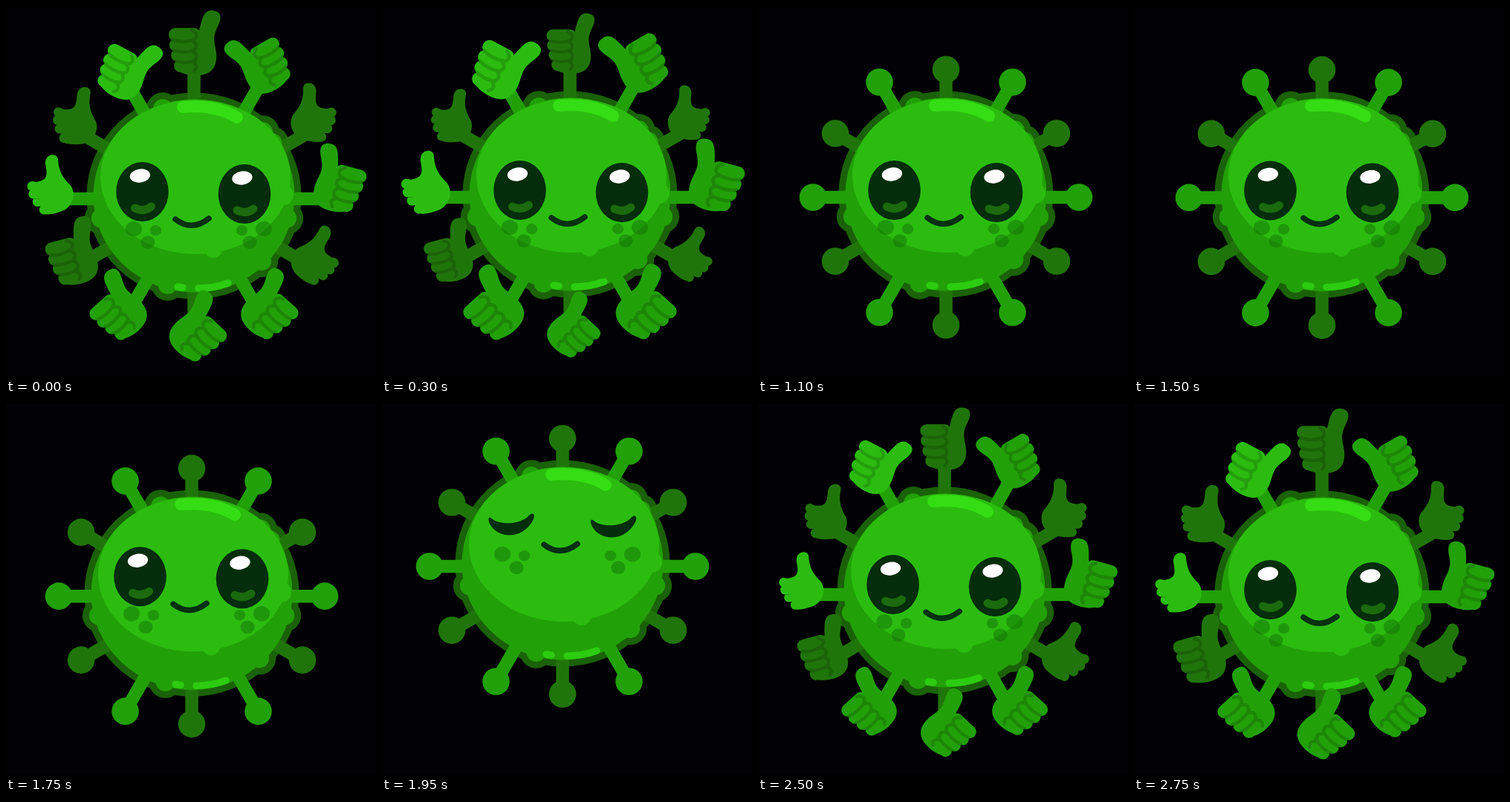
An HTML page for the animation above (2800 ms loop, 498 px wide and 498 px high).

```html
<!DOCTYPE html>
<html lang="en">
<head>
<meta charset="utf-8">
<title>Happy virus</title>
<style>
html, body { margin: 0; width: 100%; height: 100%; overflow: hidden; background: #020103; }
svg { display: block; width: 100vw; height: 100vh; }
</style>
</head>
<body>
<svg id="stage" viewBox="0 0 498 498">
  <g id="rim" fill="#1a6107"></g>
  <g id="stems" stroke-width="17.5"></g>
  <g id="body">
    <g id="mid" fill="#22a008"></g>
    <g fill="#2bbc0f">
      <ellipse cx="255" cy="228" rx="128" ry="104"/>
      <circle cx="373" cy="252" r="14"/>
      <circle cx="279" cy="325" r="12"/>
    </g>
    <g fill="none" stroke="#35de14" stroke-linecap="round">
      <path d="M238 134Q282 130 311 148" stroke-width="16"/>
      <path d="M231 376L238 377M259 378Q280 378 299 371" stroke="#2ccc10" stroke-width="9.5"/>
    </g>
  </g>
  <g id="face">
    <g id="spots" fill="#126a06" fill-opacity=".45"></g>
    <path d="M228 285Q250 302 273 284" fill="none" stroke="#043010" stroke-width="7.5" stroke-linecap="round"/>
    <g id="eyes"></g>
  </g>
  <g id="balls"></g>
  <g id="hands" stroke-linecap="round"></g>
</svg>
<script>
const NS = 'http://www.w3.org/2000/svg';
const LOOP = 2800, CX = 253, CY = 257.5, TAU = Math.PI * 2;
const DARK = '#20750a', MID = '#22a008', LIGHT = '#2bbc0f';
const $ = id => document.getElementById(id);

function add(parent, tag, attrs) {
  const el = document.createElementNS(NS, tag);
  for (const k in attrs) el.setAttribute(k, attrs[k]);
  parent.appendChild(el);
  return el;
}
const set = (el, v) => el.setAttribute('transform', v);
const show = (el, on) => el.setAttribute('visibility', on ? 'visible' : 'hidden');
const clamp = x => Math.max(0, Math.min(1, x));

// eased value at time t through [time, value] keys
function key(t, keys) {
  if (t <= keys[0][0]) return keys[0][1];
  for (let i = 1; i < keys.length; i++) {
    const [a, x] = keys[i - 1], [b, y] = keys[i];
    if (t <= b) {
      const p = (t - a) / (b - a);
      return x + (y - x) * p * p * (3 - 2 * p);
    }
  }
  return keys[keys.length - 1][1];
}

// both hands point their fingers left, thumb up
function fist(g) {
  const art = add(g, 'g', { transform: 'translate(0 36)' });
  let fingers = '', lines = '';
  for (let k = 0; k < 4; k++) {
    const y = -47 + 14 * k;
    fingers += `M${-25 + 0.8 * k * k} ${y}L0 ${y}`;
    lines += `M-3 ${y - 6}q11 6 3 13`;
    if (k < 3) lines += `M${-30 + k} ${y + 7}q15 5 30 0`;
  }
  add(art, 'path', { d: fingers, 'stroke-width': 18 });
  add(art, 'path', {
    d: 'M-4 -50C8 -44 7 -56 10 -64C13 -76 18 -81 27 -79C38 -77 37 -68 32 -58' +
      'C24 -42 28 -38 30 -22C32 0 20 8 2 8C-10 8 -20 4 -22 0Z', stroke: 'none'
  });
  add(art, 'path', { d: lines, fill: 'none', stroke: '#000', 'stroke-opacity': 0.16, 'stroke-width': 4.5 });
}
function open(g) {
  let fingers = '';
  for (let k = 0; k < 4; k++) fingers += `M${-25 + 1.8 * k * k} ${2 + 10.5 * k}L10 ${8 + 5 * k}`;
  add(g, 'path', { d: fingers, 'stroke-width': 13 });
  add(g, 'path', {
    d: 'M-18 -4C-2 -6 -5 -16 -7 -28C-8 -42 9 -44 10 -34C11 -16 18 -8 27 1' +
      'C36 14 28 32 14 36C6 39 0 40 -6 40L-20 8Z', stroke: 'none'
  });
}

// clockwise from the top; end = moment the hand has shrunk away
const HANDS = [
  { draw: fist, turn: 0, lift: 38, end: 960 },
  { draw: fist, turn: -30, lift: 31, end: 850 },
  { draw: open, turn: -5, lift: 30, end: 778 },
  { draw: fist, turn: 15, lift: 26, end: 905 },
  { draw: open, turn: 22, lift: 11, end: 900 },
  { draw: fist, turn: 42, lift: 10, end: 925 },
  { draw: fist, turn: 43, lift: -3, end: 970 },
  { draw: fist, turn: -42, lift: 9, end: 640 },
  { draw: fist, turn: -15, lift: 14, end: 630 },
  { draw: open, turn: 0, lift: 19, end: 850 },
  { draw: open, turn: 15, lift: 26, end: 850 },
  { draw: fist, turn: 28, lift: 23, end: 920 }
];

// body with its bumps, drawn twice: wider for the rim
for (const [id, grow] of [['rim', 9], ['mid', 0]]) {
  add($(id), 'ellipse', { cx: CX, cy: 253.5, rx: 135.5 + grow, ry: 130 + grow });
  for (const deg of [-109, -44, -35, 14, 45, 106, 166]) {
    const a = deg * TAU / 360;
    add($(id), 'circle', { cx: CX + 129 * Math.cos(a), cy: 253.5 + 124 * Math.sin(a), r: 13 + grow });
  }
}

for (const side of [-1, 1])
  for (const [x, cy, r] of [[87.5, 298, 11], [68.5, 316, 9.5], [58, 300, 7.7]])
    add($('spots'), 'ellipse', { cx: 259.5 + side * x, cy, rx: r, ry: r * 0.93 });

const eyes = [[183.5, 248], [321, 251]].map(([x, y]) => {
  const g = add($('eyes'), 'g', { transform: `translate(${x} ${y})` });
  const ball = add(g, 'g', {});
  add(ball, 'ellipse', { rx: 35.3, ry: 40, fill: '#042d0b' });
  add(ball, 'ellipse', { cx: -3, cy: -21.5, rx: 13.7, ry: 9, fill: '#fff', transform: 'rotate(-8 -3 -21)' });
  add(ball, 'path', { d: 'M-10 22Q2 28 12 20', fill: 'none', stroke: '#1b6a0d', 'stroke-width': 11, 'stroke-linecap': 'round' });
  const lid = add(g, 'path', { d: 'M-27 1C-18 11 14 11 25 -3C31 -8 34 -1 28 7C14 30 -18 30 -29 8Q-32 -1 -27 1Z', fill: '#042d0b' });
  return { ball, lid };
});

const spikes = HANDS.map((h, i) => {
  const odd = i % 2, ang = i * TAU / 12, sx = Math.sin(ang), sy = -Math.cos(ang);
  const R = odd ? 179 : 172, tone = odd ? MID : DARK;
  const fill = i === 6 ? MID : i === 9 || i === 11 ? LIGHT : tone;
  const flip = i > 0 && i < 7 ? -1 : 1;
  const stem = add($('stems'), 'line', { stroke: tone });
  const ball = add($('balls'), 'circle', { r: 18.3, fill: tone });
  const hand = add($('hands'), 'g', { fill, stroke: fill });
  h.draw(add(hand, 'g', {
    transform: `translate(${14 * sx + 0.22 * h.turn} ${-h.lift}) rotate(${h.turn}) scale(${flip} 1)`
  }));
  return { odd, sx, sy, x: R * sx, y: R * sy, stem, ball, hand, end: h.end };
});

const MOVE_X = [[1650, 0], [1930, -10], [2350, -10], [2560, 0]];
const MOVE_Y = [[0, 2], [300, 0], [1150, 0], [1300, -8], [1480, 0], [1650, 9], [1700, 6], [1950, -39],
  [2080, -44], [2300, 36], [2450, -4], [2600, 3], [2750, 2]];
const NOD = [[1650, 0], [1930, -57], [2060, -54], [2300, 33], [2480, -3], [2600, 0]];
const LOOK = [[0, 0], [250, 2], [800, 2], [1100, 0]];
const SQUASH = [[2200, 0], [2300, 0.035], [2450, -0.01], [2600, 0]];
const BLINK = [[620, 1], [710, 0], [850, 0], [950, 1], [1760, 1], [1850, 0], [2400, 0], [2500, 1]];
const GROW = [[2100, 0], [2200, 0.77], [2255, 1.25], [2310, 1.22], [2460, 0.95], [2600, 1.02], [2750, 1]];

function handSize(t, s) {
  // the right side settles a little earlier
  if (t > 1200) return key(t < 2200 ? t : t + 70 * Math.max(0, s.sx) ** 3 * clamp((t - 2200) / 100), GROW);
  const w = TAU * t / 400;
  const pulse = s.odd ? 1 + 0.06 * (1 - Math.cos(w)) : 1 + 0.07 * Math.sin(w);
  const p = clamp((t - s.end + 250) / 250);
  return pulse * (1 - p) * (1 + 1.5 * p);
}

function ballSize(t, s) {
  if (t > 2100) return 1 - clamp((t - 2100) / 80);
  const p = clamp((t - s.end + 15) / 120) - 1;
  return 1 + 2.7 * p ** 3 + 1.7 * p ** 2;
}

function draw(t) {
  const dx = key(t, MOVE_X), dy = key(t, MOVE_Y), q = key(t, SQUASH), o = key(t, BLINK);
  const at = `translate(${dx} ${dy + 393 * q / 2}) scale(1 ${1 - q / 2})`;
  set($('rim'), at);
  set($('body'), at);
  set($('face'), `translate(${dx} ${dy + key(t, NOD)})`);
  set($('eyes'), `translate(${key(t, LOOK)} 0)`);
  for (const e of eyes) {
    show(e.ball, o > 0.25);
    show(e.lid, o <= 0.25);
    set(e.ball, `translate(0 ${(1 - o) * 12}) scale(1 ${o})`);
  }
  const cx = CX + dx, cy = CY + dy - 150 * q;
  for (const s of spikes) {
    const x = cx + s.x, y = cy + s.y * (1 - q);
    const ends = { x1: x, y1: y, x2: cx + 110 * s.sx, y2: cy + 110 * s.sy };
    for (const k in ends) s.stem.setAttribute(k, ends[k]);
    for (const [el, size] of [[s.ball, ballSize(t, s)], [s.hand, handSize(t, s)]]) {
      show(el, size > 0.02);
      set(el, `translate(${x} ${y}) scale(${Math.max(size, 0.01)})`);
    }
  }
}

const start = performance.now();
function tick() {
  draw((performance.now() - start) % LOOP);
  requestAnimationFrame(tick);
}
tick();
</script>
</body>
</html>
```
